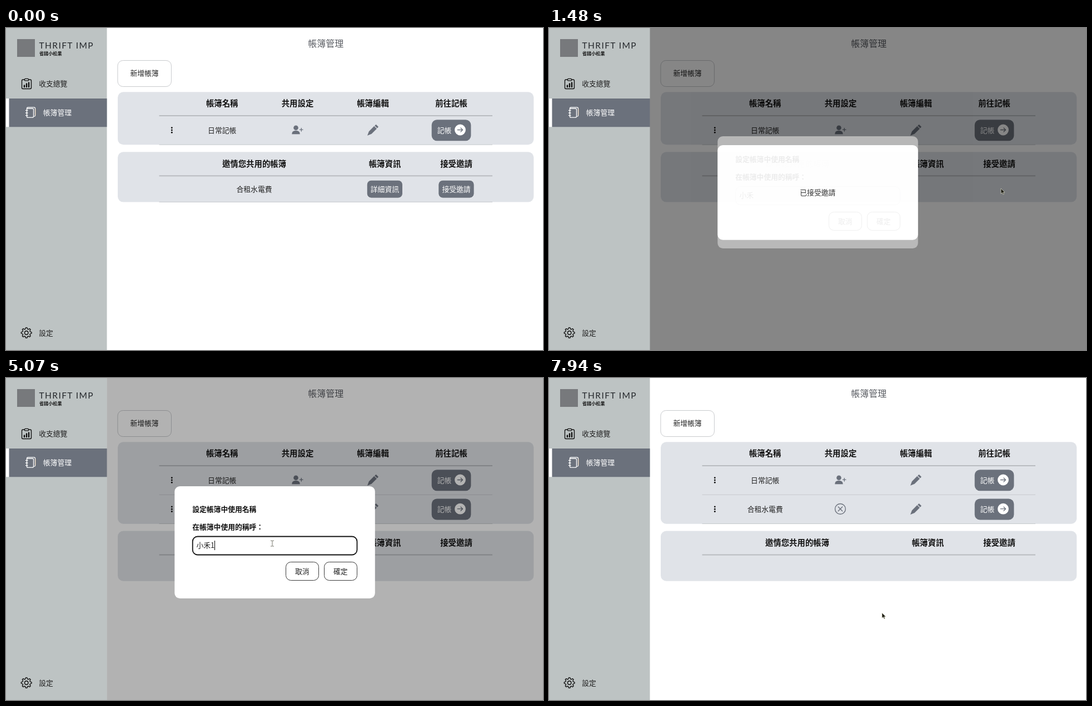
An HTML page that plays this animation: 966 px wide and 580 px high, repeating every 8 s.

```html
<!DOCTYPE html>
<html lang="zh-Hant">
<head>
<meta charset="utf-8">
<title>帳簿管理</title>
<style>
  html, body { margin: 0; width: 100%; height: 100%; overflow: hidden; background: #fff; }
  svg { display: block; width: 966px; height: 580px; }
  text { font-family: "Noto Sans CJK TC", "Noto Sans TC", "Noto Sans CJK JP", "Noto Sans CJK", sans-serif; white-space: pre; }
  .brand { font-family: Lato, "Open Sans", sans-serif; letter-spacing: 1.4px; }
</style>
</head>
<body>
<svg id="stage" viewBox="0 0 966 580" xmlns="http://www.w3.org/2000/svg"></svg>
<script>
const LOOP = 8000;
const SLATE = '#6b717c', PANEL = '#e0e3e8', INK = '#111';

// Text is placed by the visual centre of its line.
const text = (x, y, s, { size = 12.8, fill = '#222', weight = 350, anchor = 'middle', id = '', cls = '' } = {}) =>
  `<text x="${x}" y="${y + size * 0.38}" font-size="${size}" fill="${fill}" font-weight="${weight}" text-anchor="${anchor}" id="${id}" class="${cls}">${s}</text>`;
const left = (x, y, s, o) => text(x, y, s, { anchor: 'start', ...o });
const head = (x, y, s) => text(x, y, s, { size: 14.4, weight: 600, fill: INK });
const box = (x, y, w, h, r, fill, extra = '') =>
  `<rect x="${x}" y="${y}" width="${w}" height="${h}" rx="${r}" fill="${fill}" ${extra}/>`;
const path = (d, stroke, width = 1.4) =>
  `<path d="${d}" fill="none" stroke="${stroke}" stroke-width="${width}" stroke-linecap="round" stroke-linejoin="round"/>`;
const rule = (y, h, fill) => box(275.5, y, 599.5, h, 0, fill);

function gear(cx, cy) {
  let d = '';
  for (let i = 0; i < 96; i++) {
    const a = i / 96 * Math.PI * 2;
    const r = 8.2 + 1.2 * Math.tanh(2.5 * Math.cos(8 * a));
    d += `${i ? 'L' : 'M'}${(cx + r * Math.cos(a)).toFixed(2)} ${(cy + r * Math.sin(a)).toFixed(2)}`;
  }
  return path(d + 'Z', INK) + `<circle cx="${cx}" cy="${cy}" r="3.2" fill="none" stroke="${INK}" stroke-width="1.4"/>`;
}

const sidebar = () => box(0, 0, 181.5, 580, 0, '#bdc3c3')
  + box(20, 20, 32, 32, 0, '#77797c')
  + left(59.5, 31, 'THRIFT IMP', { size: 15.5, weight: 400, fill: '#25282c', cls: 'brand' })
  + left(60, 45.5, '省錢小松果', { size: 8.1, weight: 700, fill: INK })
  + path('M33 93H30.5Q28.5 93 28.5 95V107.5Q28.5 109.5 30.5 109.5H43.5Q45.5 109.5 45.5 107.5V95Q45.5 93 43.5 93H41', INK)
  + box(33.5, 91.3, 7, 3.6, 1.2, 'none', `stroke="${INK}" stroke-width="1.3"`)
  + path('M33 106V103.5M37 106V100.5M41 106V98.5', INK, 2.4)
  + left(59.2, 100.5, '收支總覽')
  + box(0, 127, 5.6, 51.2, 0, '#fff') + box(5.6, 127, 175.9, 51.2, 0, SLATE)
  + path('M37.5 146V145Q37.5 142.8 39.7 142.8H50.3Q52.5 142.8 52.5 145V157.5Q52.5 159 51 159.3', '#fff', 1.3)
  + path('M37.5 146Q37.5 145 39 145H47.5Q49.5 145 49.5 147V159Q49.5 161.2 47.5 161.2H39.5Q37.5 161.2 37.5 159.5Z', '#fff', 1.3)
  + path('M35.5 148.5H39M35.5 153H39M35.5 157.5H39', '#fff', 1.3)
  + path('M53 146V157', '#e2bf94', 0.7)
  + left(66.8, 152.5, '帳簿管理', { fill: '#fff' })
  + gear(36.7, 549) + left(59.2, 549.5, '設定');

const person = `<g fill="${SLATE}"><circle cx="521.5" cy="179.7" r="4.3"/><path d="M514.2 191.3Q514 184.8 521.5 184.8T528.8 191.3Z"/></g>`
  + path('M531.3 180.3V186M528.5 183.2H534', SLATE, 1.3);
const cross = `<circle cx="524" cy="183.7" r="9.4" fill="none" stroke="${SLATE}" stroke-width="1.4"/>`
  + path('M520.2 179.9L527.8 187.5M527.8 179.9L520.2 187.5', SLATE);

const row = (name, icon) => [179.7, 184, 188.3].map(y => `<circle cx="298.3" cy="${y}" r="1.45" fill="${INK}"/>`).join('')
  + text(388.7, 184, name) + icon
  + `<path transform="translate(650 173.7) scale(1.25)" fill="${SLATE}" d="M12.5 0L10.5 1.8L14.2 5.5L16 3.5ZM13.5 6.2L9.8 2.5L2.3 10L0 16L6 13.7Z"/>`
  + box(765.7, 165.3, 70.7, 38, 9.5, SLATE) + text(788.5, 184, '記帳', { fill: '#fff' })
  + '<circle cx="817" cy="183.5" r="9.9" fill="#fff"/>'
  + path('M812.3 183.5H821.5M818 180L821.5 183.5L818 187', SLATE, 1.3)
  + rule(209.7, 1, '#c6c9cd');

const pill = (x, s) => box(x, 274.2, 64.3, 32, 8, SLATE, 'stroke="#f2f4f6" stroke-width=".8"') + text(x + 32.2, 290.3, s, { fill: '#fff' });

const page = () => text(575.3, 28, '帳簿管理', { size: 16, weight: 500, fill: '#5a5d63' })
  + box(200.9, 58.5, 96.5, 47, 9.5, '#fff', 'stroke="#c8cacd"') + text(249, 81.6, '新增帳簿')
  + box(201, 115.2, 748.3, 95, 10, PANEL, 'id="books"')
  + head(388.7, 136, '帳簿名稱') + head(524.5, 136, '共用設定') + head(660, 136, '帳簿編輯') + head(801, 136, '前往記帳')
  + rule(157, 2, '#b9bcc0') + row('日常記帳', person)
  + `<g id="joined" transform="translate(0 52.2)">${row('合租水電費', cross)}</g>`
  + `<g id="invites">${box(201, 223.3, 748.3, 90.3, 10, PANEL)}`
  + head(446.5, 244.3, '邀情您共用的帳簿') + head(681.5, 244.3, '帳簿資訊') + head(810, 244.3, '接受邀請')
  + rule(265.3, 2, '#b9bcc0')
  + `<g id="pending">${text(446.5, 290.3, '合租水電費') + pill(649.2, '詳細資訊') + pill(777.8, '接受邀請') + rule(313, 1, '#c6c9cd')}</g></g>`;

const layer = (id, body) => `<g id="${id}">${box(181.5, 0, 784.5, 580, 0, '#000', 'fill-opacity=".3"')}${body}</g>`;
const button = (x, s) => box(x, 331.5, 59, 33, 9, '#fff', 'stroke="#3a3a3a"') + text(x + 29.3, 347.8, s);

const form = () => box(303.3, 195, 360.5, 202, 9.5, '#fff')
  + left(335.2, 236, '設定帳簿中使用名稱', { weight: 600, fill: INK })
  + left(335.2, 268, '在帳簿中使用的稱呼：', { weight: 600, fill: INK })
  + box(335.7, 285.5, 295.8, 33, 9, '#fff', 'id="field"')
  + left(342.5, 301.6, '小禾', { id: 'nick' }) + box(368, 293, 1, 17, 0, '#000', 'id="caret"')
  + button(503.5, '取消') + button(572.5, '確定');

const cursors = `<g id="pointer">
  <path id="arrow" d="M0 0V9.5L2.3 7.5L3.8 11L5.4 10.3L3.9 7H6.9Z" fill="#1d1d14" stroke="#f4f4e0" stroke-width=".6"/>
  <path id="hand" d="M-1 .8Q0 -.4 1 .8V4.5L4 5.2Q5 5.5 4.9 6.5L4.3 11.5H-1.3L-3.8 7.5Q-3.5 6.2 -1 8Z" fill="#fff" stroke="#222" stroke-width=".8"/>
  <path id="beam" d="M-3 -5H-.8L0 -4.5L.8 -5H3M0 -4.5V4.5M-3 5H-.8L0 4.5L.8 5H3" fill="none" stroke="#77776c" stroke-width="1"/>
</g>`;

document.getElementById('stage').innerHTML = sidebar() + page() + layer('form', form())
  + layer('note', box(303.3, 211, 360.5, 170.7, 9.5, '#fff') + text(483.3, 296, '', { id: 'noteText' })) + cursors;

const el = id => document.getElementById(id);
const set = (id, attrs) => { for (const k in attrs) el(id).setAttribute(k, attrs[k]); };
const show = (id, on) => { el(id).style.display = on ? '' : 'none'; };

const clamp = v => Math.min(1, Math.max(0, v));
const smooth = v => v * v * (3 - 2 * v);
const ramp = (t, start, length) => smooth(clamp((t - start) / length));
const within = (t, a, b) => t >= a && t < b;

// time, x, y
const track = [
  [130, 866, 388], [480, 813, 289], [1640, 813, 289], [2240, 610, 388], [2660, 610, 388],
  [3140, 485.5, 294], [3300, 479, 298], [5530, 479, 298], [6170, 597, 351], [7050, 597, 351], [7460, 599, 423]
];

function pointerAt(t) {
  const i = track.findIndex(k => k[0] > t);
  if (i < 0) return track[track.length - 1].slice(1);
  if (i === 0) return track[0].slice(1);
  const [a, b] = [track[i - 1], track[i]];
  const p = ramp(t, a[0], b[0] - a[0]);
  return [a[1] + (b[1] - a[1]) * p, a[2] + (b[2] - a[2]) * p];
}

function pointerKind(t, x, y) {
  const over = (x0, y0, x1, y1) => x > x0 && x < x1 && y > y0 && y < y1;
  if (t < 1010) return over(778, 274, 842, 306) ? 'hand' : 'arrow';
  if (within(t, 2850, 7080)) {
    if (over(335, 285, 632, 319)) return 'beam';
    if (over(503, 332, 563, 365) || over(572, 332, 632, 365)) return 'hand';
  }
  return 'arrow';
}

function draw(t) {
  const joined = t >= 1610;
  show('pending', t < 1010);
  show('joined', joined);
  set('books', { height: joined ? 147.5 : 95 });
  set('invites', { transform: `translate(0 ${joined ? 52.2 : 0})` });

  const opened = ramp(t, 1110, 450), saved = ramp(t, 6540, 300);
  set('form', { opacity: opened - saved });
  set('note', { opacity: opened - ramp(t, 2560, 320) + saved - ramp(t, 7670, 260) });
  el('noteText').textContent = t < 4000 ? '已接受邀請' : '已成功設定帳簿內的顯示名稱~';

  const focused = within(t, 3420, 6370), typed = t >= 5070;
  set('field', { stroke: focused ? '#111' : '#cbcdd0', 'stroke-width': focused ? 1.8 : 1 });
  el('nick').textContent = typed ? '小禾1' : '小禾';
  set('caret', { x: typed ? 375 : 368 });
  show('caret', within(t, 3420, 3950) || within(t, 4480, 4940) || within(t, 5070, 5600) || within(t, 6130, 6370));

  const [x, y] = pointerAt(t), kind = pointerKind(t, x, y);
  set('pointer', { transform: `translate(${x} ${y})` });
  show('pointer', t >= 130);
  for (const id of ['arrow', 'hand', 'beam']) show(id, id === kind);
}

const start = performance.now();
function tick() {
  draw((performance.now() - start) % LOOP);
  requestAnimationFrame(tick);
}
tick();
</script>
</body>
</html>
```
